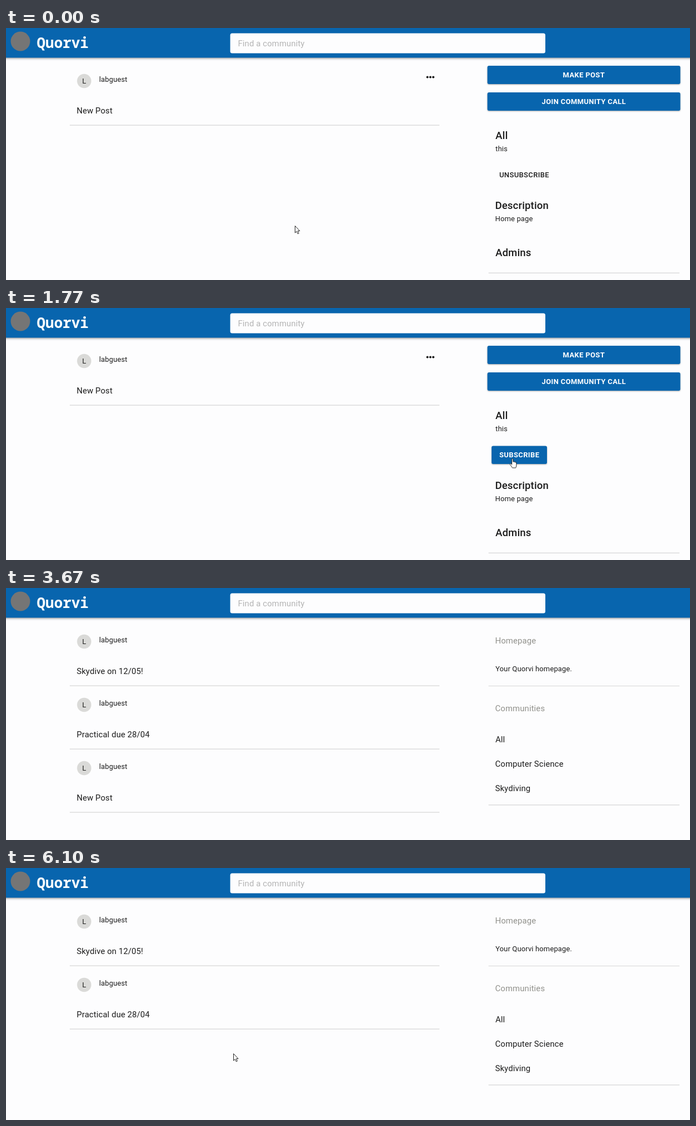
These frames come from a looping animation (1234 px wide and 454 px high, 6.13 s). An HTML page:

```html
<!DOCTYPE html>
<html lang="en">
<head>
<meta charset="utf-8">
<title>Community feed</title>
<style>
  html, body { margin: 0; width: 100%; height: 100%; overflow: hidden; background: #fdfdfe; }
  svg { display: block; width: 100vw; height: 100vh; }
  text { font: 14.857px Roboto, sans-serif; letter-spacing: .00938em; fill: #1c1c1c; }
  .small { font-size: 13px; letter-spacing: .01071em; }
  .head { font-size: 18.57px; font-weight: 500; letter-spacing: .0075em; }
  .btn { font-size: 13px; font-weight: 500; letter-spacing: .02857em; }
  .white { font-weight: 700; fill: #fff; }
  .mid { text-anchor: middle; }
  .muted { fill: #91918c; }
  .hint { fill: #b4b4b4; }
  .brand { font: 700 26px "Noto Sans Mono", "DejaVu Sans Mono", monospace; letter-spacing: 0; fill: #fff; }
  .blue { fill: #0865ae; }
  .raised { filter: drop-shadow(0 1px 1px #0005); }
  .bar { filter: drop-shadow(0 1px 2px #0007); }
  .line { stroke: #d6d6d6; stroke-width: 1.2; }
  .pointer path { fill: #fff; stroke: #222; stroke-width: 1; stroke-linejoin: round; }

  .community, .home, .stale, .leave, .join, .arrow, .hand { animation: 6130ms step-end infinite; }
  .community { animation-name: community; }
  .home { animation-name: home; }
  .stale { animation-name: stale; }
  .leave { animation-name: leave; }
  .join { animation-name: join; }
  .arrow { animation-name: arrow; }
  .hand { animation-name: hand; }
  .hover { animation: hover 6130ms linear infinite; }
  .pointer { animation: move 6130ms ease-in-out infinite; }

  @keyframes community { 0% { opacity: 1 } 45.2%, 100% { opacity: 0 } }
  @keyframes home { 0% { opacity: 0 } 45.2%, 100% { opacity: 1 } }
  @keyframes stale { 0% { opacity: 1 } 79.9%, 100% { opacity: 0 } }
  @keyframes leave { 0% { opacity: 1 } 24.5%, 100% { opacity: 0 } }
  @keyframes join { 0% { opacity: 0 } 24.5%, 100% { opacity: 1 } }
  @keyframes hover { 0%, 13.8% { opacity: 0 } 17.6%, 100% { opacity: 1 } }
  @keyframes arrow { 0% { opacity: 1 } 13.8% { opacity: 0 } 31% { opacity: 1 } 39% { opacity: 0 } 55%, 100% { opacity: 1 } }
  @keyframes hand { 0% { opacity: 0 } 13.8% { opacity: 1 } 31% { opacity: 0 } 39% { opacity: 1 } 55%, 100% { opacity: 0 } }
  @keyframes move {
    0%, 3.3% { transform: translate(521px, 356px) }
    14.7%, 28.5% { transform: translate(916px, 272px) }
    40%, 53% { transform: translate(31px, 27px) }
    57.1%, 75.7% { transform: translate(62px, -24px) }
    77.8% { transform: translate(73px, 11px); animation-timing-function: ease-in }
    83.7% { transform: translate(114px, 78px); animation-timing-function: ease-out }
    91.4% { transform: translate(400px, 346px) }
    95.4%, 100% { transform: translate(410px, 334px) }
  }
</style>
</head>
<body>
<svg viewBox="0 0 1234 454" preserveAspectRatio="none">
  <defs>
    <g id="author">
      <circle cx="141" cy="95.5" r="12.8" fill="#dadad8"/>
      <text class="small mid" x="141" y="100.3">L</text>
      <text class="small" x="168" y="97.3">labguest</text>
    </g>
    <path id="rule" class="line" d="M115 175.2H782"/>
    <path id="sideRule" class="line" d="M870.5 0H1215"/>
  </defs>
  <rect width="1234" height="454" fill="#fdfdfe"/>

  <g class="community">
    <use href="#author"/>
    <g fill="#111">
      <circle cx="760.3" cy="88.6" r="2"/>
      <circle cx="765.6" cy="88.6" r="2"/>
      <circle cx="770.9" cy="88.6" r="2"/>
    </g>
    <text x="127.5" y="154">New Post</text>
    <use href="#rule"/>

    <rect class="blue raised" x="868.5" y="68" width="348" height="33" rx="3"/>
    <text class="btn white mid" x="1042.5" y="88.7">MAKE POST</text>
    <rect class="blue raised" x="868.5" y="116" width="348" height="33" rx="3"/>
    <text class="btn white mid" x="1042.5" y="136.7">JOIN COMMUNITY CALL</text>

    <text class="head" x="883" y="199.7">All</text>
    <text class="small" x="883" y="221.5">this</text>
    <g class="leave">
      <rect class="hover" x="876" y="248.7" width="118" height="32.5" rx="3" fill="#c9c9c9"/>
      <text class="btn" x="890" y="269.2">UNSUBSCRIBE</text>
    </g>
    <g class="join">
      <rect class="blue raised" x="876" y="248.5" width="100" height="32.5" rx="3"/>
      <text class="btn white" x="890" y="269.2">SUBSCRIBE</text>
    </g>
    <text class="head" x="882.5" y="326">Description</text>
    <text class="small" x="882.5" y="347.7">Home page</text>
    <text class="head" x="883" y="411.3">Admins</text>
    <use href="#sideRule" y="441.4"/>
  </g>

  <g class="home">
    <g transform="translate(0 1)">
      <use href="#author"/>
      <text x="127.5" y="154">Skydive on 12/05!</text>
      <use href="#rule"/>
    </g>
    <g transform="translate(0 115)">
      <use href="#author"/>
      <text x="127.5" y="154">Practical due 28/04</text>
      <use href="#rule"/>
    </g>
    <g class="stale">
      <g transform="translate(0 229)">
        <use href="#author"/>
        <text x="127.5" y="154">New Post</text>
        <use href="#rule"/>
      </g>
    </g>

    <text class="muted" x="882.5" y="99.5">Homepage</text>
    <text class="small" x="883" y="149.5">Your Quorvi homepage.</text>
    <use href="#sideRule" y="176.5"/>
    <text class="muted" x="882.5" y="221.5">Communities</text>
    <text x="883" y="277.7">All</text>
    <text x="882.5" y="322">Computer Science</text>
    <text x="882.5" y="366">Skydiving</text>
    <use href="#sideRule" y="390.8"/>
  </g>

  <rect class="blue bar" x="-8" y="-8" width="1250" height="61.5"/>
  <circle cx="26" cy="24" r="17.5" fill="#757575"/>
  <text class="brand" x="55.5" y="36">Quorvi</text>
  <rect x="404.5" y="9.5" width="568.5" height="36" rx="3.5" fill="#fdfdfe"/>
  <text class="hint" x="418.5" y="32.7">Find a community</text>

  <g class="pointer">
    <path class="arrow" d="M.5 .5V13L3.3 10.4L5.3 14.8L7.3 13.9L5.4 9.6H9Z"/>
    <path class="hand" d="M-1.5 10.5V1.2Q-1.5 0 -.4 0Q.8 0 .8 1.2V5.5Q2 4.6 3 5.9Q4.3 5.2 5 6.5Q6.8 6.2 6.8 8V12Q6.8 14 5.5 16.5H-.5Q-1.5 14.5 -4.6 10.6Q-5.2 9 -3.8 8.8Q-2.6 9 -1.5 10.5Z"/>
  </g>
</svg>
</body>
</html>
```
